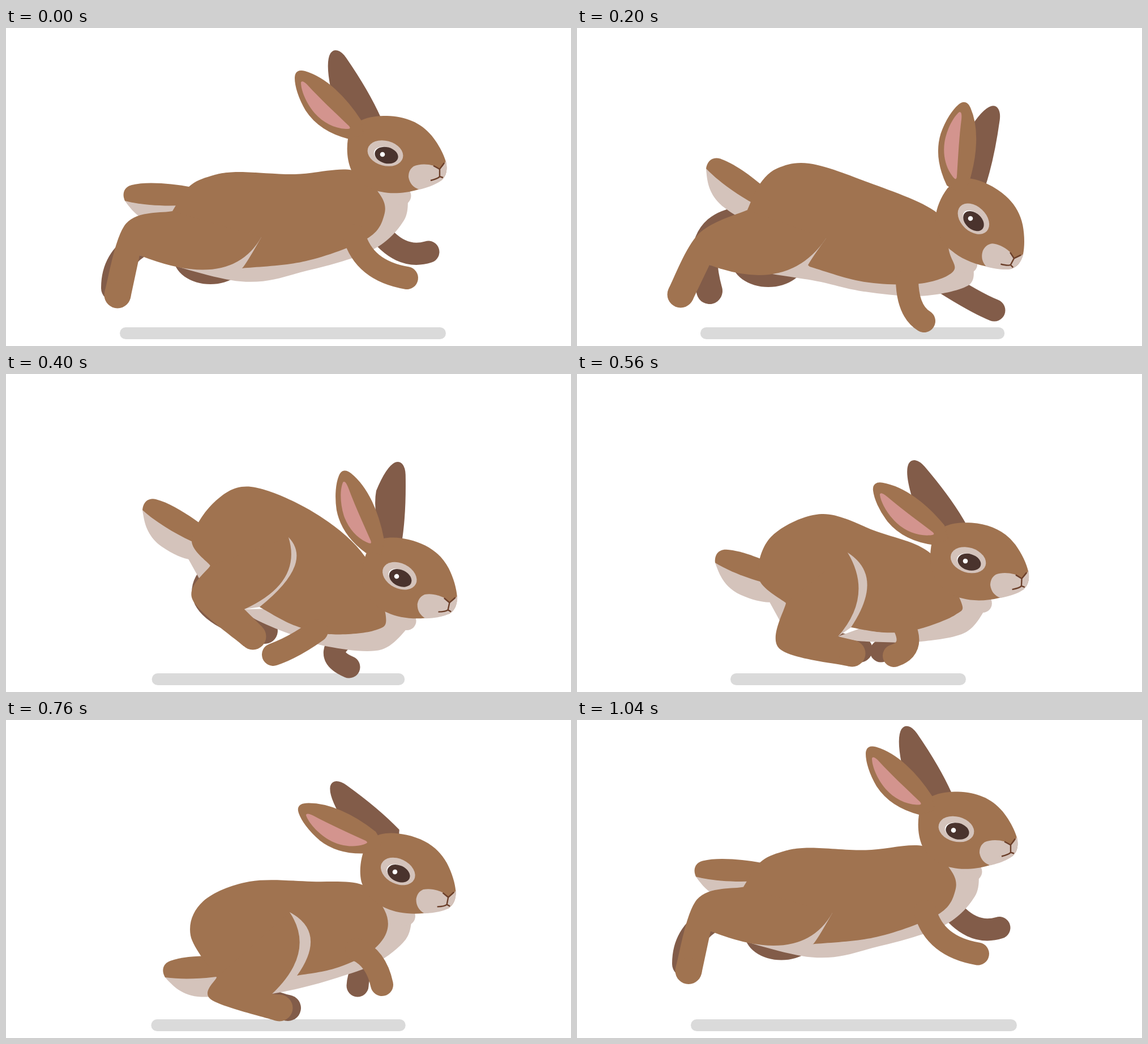
Animation, 998 px wide and 561 px high, one loop 1080 ms. Source, as an HTML page:

```html
<!DOCTYPE html>
<html lang="en">
<head>
<meta charset="utf-8">
<title>Running rabbit</title>
<style>
  html, body { margin: 0; width: 100%; height: 100%; overflow: hidden; background: #fff; }
  svg { display: block; width: 100vw; height: 100vh; }
  .fur { fill: #a07350; }
  .dark { fill: #825c49; }
  .pale { fill: #d4c3bb; }
  .limb { fill: none; stroke-linecap: round; }
</style>
</head>
<body>
<svg viewBox="0 0 998 561">
  <rect id="shadow" y="528" height="21" rx="10.5" fill="#dadada"/>
  <path id="farFore" class="limb" stroke="#825c49" stroke-width="39"/>
  <path id="farHind" class="limb" stroke="#825c49" stroke-width="46"/>
  <ellipse id="thigh" class="dark" rx="65" ry="47"/>
  <path id="seat" class="pale"/>
  <g id="tail">
    <path class="pale" d="M0,0 C12,16 26,36 60,41 C85,44 105,42 116,37 L130,5 Z"/>
    <path class="fur" d="M0,0 C-5,-11 -3,-24 12,-28 C40,-35 85,-30 113,-25 L130,-10 L125,6 C90,10 40,10 0,0 Z"/>
  </g>
  <path id="belly" class="pale"/>
  <circle id="tuft" class="pale" r="16.5"/>
  <path id="coat" class="fur"/>
  <path id="rim" class="pale"/>
  <path id="haunch" class="fur"/>
  <circle id="paw" class="fur" r="23.5"/>
  <path id="nearFore" class="limb" stroke="#a07350" stroke-width="40"/>
  <g id="head">
    <path id="farEar" class="dark" stroke="#825c49" stroke-width="2" d="M661,158 C645,122 620,82 600,53 C590,39 580,37 574,45 C568,55 569,78 574,104 C585,130 610,155 630,172 L655,172 Z"/>
    <path class="fur" d="M610,251 C603,235 601,215 604,195 C610,178 617,168 627,163 C642,156 657,155 673,155 C705,156 732,166 752,190 C764,205 773,222 777,236 C780,250 778,260 770,268 C755,278 735,283 728,285 C705,292 680,293 663,289 C640,285 620,270 610,251 Z"/>
    <path class="pale" d="M756,243 C742,239 729,240 720,244 C713,249 711,255 711,263 C713,274 719,281 730,285 C750,280 764,274 772,266 C779,257 780,246 777,234 C774,242 770,246 766,249 Z"/>
    <path d="M755,243 L766,249 L774,238 M766,249 V262 M750,269 Q763,266 766,262 L772,264" fill="none" stroke="#6b3f2a" stroke-width="2.4"/>
    <ellipse class="pale" rx="32" ry="22" transform="translate(670 221) rotate(15)"/>
    <ellipse fill="#fff" rx="21" ry="13.5" transform="translate(670.5 223.5) rotate(14)"/>
    <ellipse fill="#4a332d" rx="21" ry="14.3" transform="translate(672 224.5) rotate(14)"/>
    <circle cx="665" cy="223" r="4.3" fill="#fff"/>
    <g id="nearEar">
      <path class="fur" stroke="#a07350" stroke-width="2" d="M606,195 C570,186 545,168 530,145 C517,123 511,102 511,88 C511,77 518,74 528,77 C565,88 600,122 627,164 L632,188 Z"/>
      <path fill="#d3948e" d="M521,96 C523,92 528,96 533,101 C555,125 580,148 606,173 C610,178 606,178 600,178 C580,177 560,167 545,150 C530,132 521,110 521,96 Z"/>
    </g>
  </g>
</svg>
<script>
const LOOP = 1080, STEP = 40, LIFT = 28.5, PAW = 23.5;
const poses = [];
const pose = (time, joints) => poses.push({ time, joints });

// turn: angles of head, near ear, far ear and tail. Fore and far limbs: bend, paw.
const leap = {
  turn: [0, 0, 0, 0], head: [665, 223], tail: [210, 305], seat: [294, 323],
  back: [323,280, 362,261, 410,254, 510,258, 612,251],
  bib: [668, 330], chest: [637, 372], fold: [415, 424],
  tip: [451, 369], knee: [396, 465], groin: [236, 401], hock: [212, 345], paw: [197, 471],
  nearFore: [632,428, 708,441], farFore: [695,411, 746,395], farHind: [190,360, 191,459]
};
pose(0, leap);

pose(200, {
  turn: [28, 22, 14.5, 32], head: [695, 336], tail: [228, 248], seat: [301, 321],
  back: [323,275, 355,247, 410,239, 500,267, 636,326],
  bib: [664, 430], chest: [605, 451], fold: [411, 421],
  tip: [440, 371], knee: [373, 470], groin: [234, 418], hock: [215, 363], paw: [183, 470],
  nearFore: [584,499, 613,517], farFore: [704,485, 737,498], farHind: [190,305, 234,464]
});

pose(400, {
  turn: [12, 10.4, 21.5, 28], head: [690, 357], tail: [241, 240], seat: [361, 338],
  back: [328,293, 368,226, 433,199, 545,245, 634,322],
  bib: [652, 452], chest: [571, 459], fold: [448, 411],
  tip: [499, 288], knee: [524, 368], groin: [421, 415], hock: [329, 397], paw: [436, 463],
  nearFore: [509,482, 472,495], farFore: [552,494, 606,517], farHind: [260,395, 457,453]
});

pose(560, {
  turn: [2.8, -9.6, -8.7, 17], head: [686, 330], tail: [244, 333], seat: [369, 404],
  back: [321,360, 343,287, 432,247, 530,278, 624,316],
  bib: [668, 425], chest: [600, 451], fold: [484, 447],
  tip: [478, 315], knee: [524, 391], groin: [461, 463], hock: [357, 484], paw: [486, 493],
  nearFore: [597,485, 560,497], farFore: [565,462, 537,489], farHind: [360,470, 499,486]
});

pose(760, {
  turn: [11, -30, -30.7, -6], head: [687, 268], tail: [281, 454], seat: [372, 454],
  back: [326,380, 348,320, 430,285, 540,285, 630,291],
  bib: [672, 375], chest: [641, 411], fold: [514, 451],
  tip: [501, 339], knee: [548, 409], groin: [470, 483], hock: [362, 493], paw: [483, 508],
  nearFore: [654,420, 664,467], farFore: [622,440, 621,469], farHind: [410,490, 498,508]
});

pose(880, {
  turn: [2, -14, -22.9, -17], head: [681, 223], tail: [275, 433], seat: [293, 428],
  back: [315,358, 340,292, 415,258, 520,253, 628,252],
  bib: [679, 335], chest: [632, 381], fold: [494, 423],
  tip: [505, 342], knee: [478, 478], groin: [358, 462], hock: [303, 465], paw: [365, 504],
  nearFore: [650,430, 699,435], farFore: [692,407, 733,411], farHind: [350,465, 418,501]
});

// The run ends in the opening leap, only higher.
const raised = Object.entries(leap).map(([name, values]) =>
  [name, name === 'turn' ? values : values.map((v, i) => i % 2 ? v - LIFT : v)]);
pose(1040, Object.fromEntries(raised));

// Cubic Hermite between poses
function sample(name, time) {
  const at = k => poses[Math.max(0, Math.min(poses.length - 1, k))];
  let k = 0;
  while (k < poses.length - 2 && time >= poses[k + 1].time) k++;
  const a = at(k), b = at(k + 1), span = b.time - a.time, u = (time - a.time) / span;
  const slope = (j, i) => (at(j + 1).joints[name][i] - at(j - 1).joints[name][i])
    / (at(j + 1).time - at(j - 1).time) * span;
  return a.joints[name].map((p, i) => {
    const q = b.joints[name][i], m = slope(k, i), n = slope(k + 1, i);
    return p + u * (m + u * (3 * (q - p) - 2 * m - n + u * (2 * (p - q) + m + n)));
  });
}

const add = ([x, y], dx, dy) => [x + dx, y + dy];
const mix = (p, q) => [(p[0] + q[0]) / 2, (p[1] + q[1]) / 2];
const pairs = values => values.flatMap((v, i) => i % 2 ? [] : [[v, values[i + 1]]]);

// Move p sideways to the direction from a to b
function aside(p, a, b, distance) {
  const dx = b[0] - a[0], dy = b[1] - a[1], scale = distance / Math.hypot(dx, dy);
  return add(p, dy * scale, -dx * scale);
}

// Smooth curve through points, without its opening command
function curve(points) {
  const at = i => points[Math.max(0, Math.min(points.length - 1, i))];
  return points[0] + points.slice(1).map((q, i) => {
    const o = at(i - 1), p = at(i), r = at(i + 2);
    const c1 = p.map((v, n) => v + (q[n] - o[n]) / 6);
    const c2 = q.map((v, n) => v - (r[n] - p[n]) / 6);
    return `C${c1} ${c2} ${q}`;
  }).join('');
}

function ramp(time, from, to) {
  const u = Math.max(0, Math.min(1, (time - from) / (to - from)));
  return u * u * (3 - 2 * u);
}

const set = (id, attributes) => {
  const node = document.getElementById(id);
  for (const [name, value] of Object.entries(attributes)) node.setAttribute(name, value);
};
const place = (id, [cx, cy]) => set(id, { cx, cy });
const limb = (id, root, [bendX, bendY, x, y]) =>
  set(id, { d: `M${root} Q${bendX},${bendY} ${x},${y}` });

function turned([x, y], [dx, dy], degrees) {
  const a = degrees * Math.PI / 180, c = Math.cos(a), s = Math.sin(a);
  return [x + dx * c - dy * s, y + dx * s + dy * c];
}

function draw(time) {
  const now = {};
  for (const name in leap) now[name] = sample(name, time);
  const { head, tail, seat, bib, chest, fold, tip, knee, groin } = now;
  const [headTurn, nearTurn, farTurn, tailTurn] = now.turn;

  // The hind leg kicks out behind before it is drawn in.
  const kick = time < 200 ? Math.sin(Math.PI * time / 200) : 0;
  const paw = add(now.paw, -45 * kick, -22 * kick);
  const hock = add(now.hock, -9 * kick, 0);

  const low = ramp(time, 40, 540) - ramp(time, 660, 1000);
  set('shadow', { x: 201 + 70 * low, width: 576 - 160 * low });

  // Torso: the pale belly is the coat's lower edge pushed outwards.
  const onHead = (dx, dy) => turned(head, [dx, dy], headTurn);
  const throat = onHead(-5, 70);
  const sag = aside(mix(chest, fold), chest, fold,
    0.06 * Math.hypot(chest[0] - fold[0], chest[1] - fold[1]));
  set('coat', { d: `M${curve([seat, ...pairs(now.back), throat, bib, chest, sag, fold])}Z` });
  const edge = [onHead(45, 72), aside(bib, throat, chest, 36), aside(chest, bib, sag, 22),
    aside(sag, chest, fold, 17), aside(fold, sag, groin, 23), groin];
  set('belly', { d: `M${curve(edge)} L${onHead(-5, 55)}Z` });
  place('tuft', onHead(34, 73));

  // Haunch, its pale rim and the lower leg, which ends on both sides of the paw
  const shin = mix(hock, groin);
  const front = aside(paw, shin, paw, PAW), heel = aside(paw, shin, paw, -PAW);
  set('haunch', { d: `M${tip} Q${knee} ${groin} L${front} L${curve([heel, hock, seat])}Z` });
  set('rim', { d: `M${tip} Q${add(knee, 20, -34)} ${fold} L${groin}Z` });
  place('paw', paw);
  place('thigh', add(knee, -35, -60));

  const tailEnd = turned(tail, [112, 38], tailTurn);
  set('seat', { d: `M${now.back.slice(0, 2)} L${tailEnd} L${mix(seat, hock)} L${seat}Z` });

  limb('nearFore', add(chest, -22, -6), now.nearFore);
  limb('farFore', mix(bib, chest), now.farFore);
  limb('farHind', mix(seat, tip), now.farHind);

  set('head', { transform: `translate(${head}) rotate(${headTurn}) translate(-665 -223)` });
  set('nearEar', { transform: `rotate(${nearTurn} 616 180)` });
  set('farEar', { transform: `rotate(${farTurn} 643 160)` });
  set('tail', { transform: `translate(${tail}) rotate(${tailTurn})` });
}

const start = performance.now();
function tick() {
  const time = (performance.now() - start) % LOOP;
  draw(Math.floor(time / STEP) * STEP);
  requestAnimationFrame(tick);
}
tick();
</script>
</body>
</html>
```
